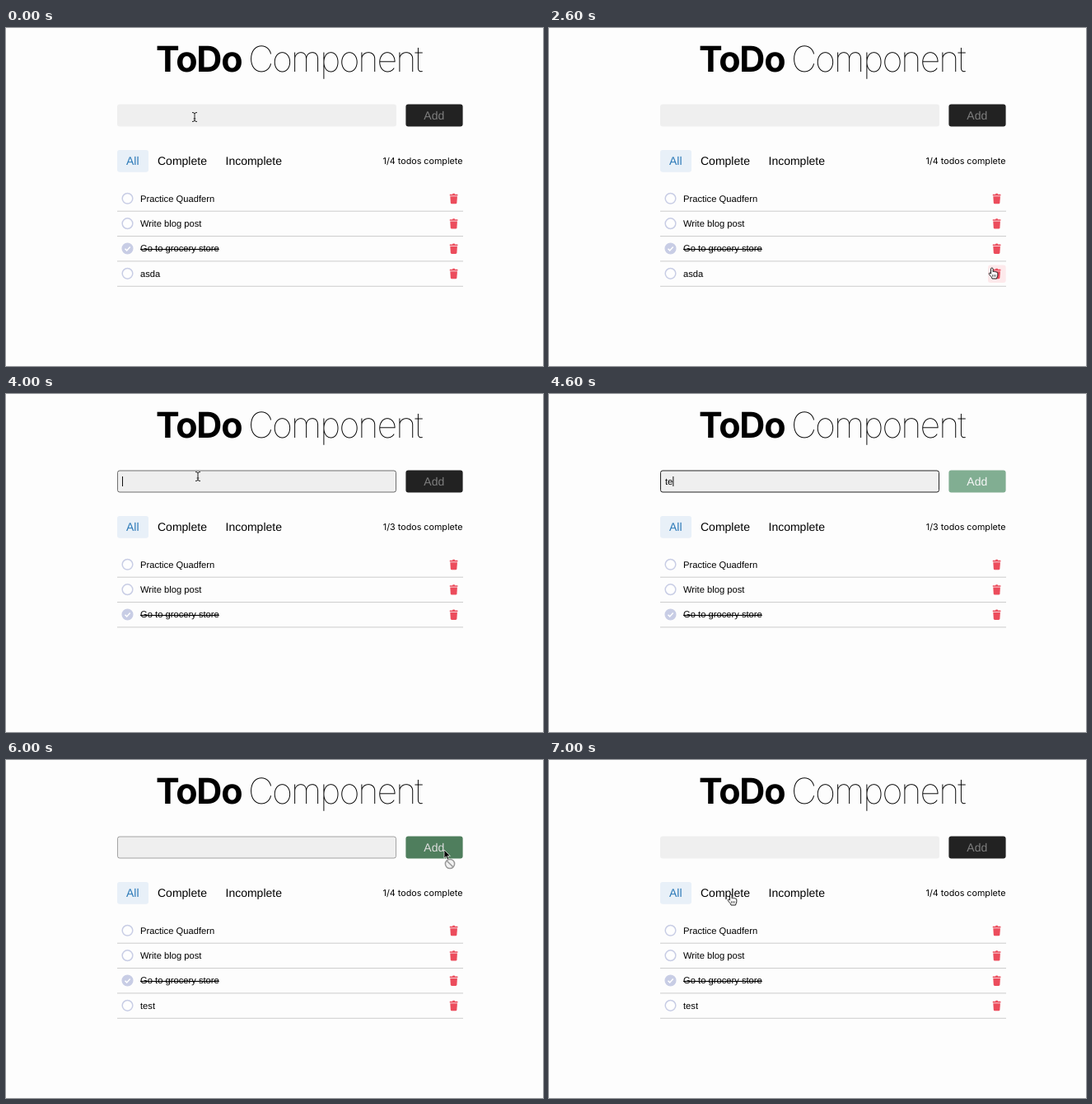
These frames come from a looping animation (652 px wide and 410 px high, 8 s). An HTML page:

```html
<!DOCTYPE html>
<html lang="en">
<head>
<meta charset="utf-8">
<title>ToDo Component</title>
<style>
html, body { margin: 0; width: 100%; height: 100%; overflow: hidden; background: #fdfdfd; }
svg { display: block; font: 14px "Liberation Sans", Arial, sans-serif; text-rendering: geometricPrecision; }
.title { font: 700 43px Inter, sans-serif; font-optical-sizing: none; letter-spacing: -1.2px; }
.title.thin { font-weight: 100; letter-spacing: -1.95px; }
.small { font-size: 11.2px; }
.count { font: 10.75px Inter, sans-serif; font-optical-sizing: none; }
.done { text-decoration: line-through; }
</style>
</head>
<body>
<svg width="652" height="410" viewBox="0 0 652 410">
  <defs>
    <g id="trash" fill="#ec4c5c">
      <path d="M538.8 201.8h3.2l.6-1h2l.6 1h3.2v1.7h-9.6z"/>
      <path d="M539.3 204.2h8.6l-.5 7.7q-.1 1.3-1.3 1.3h-5q-1.2 0-1.3-1.3z"/>
    </g>
    <g id="ibeam" fill="none" stroke="#222">
      <path d="M-3-5.5q3 0 3 1.5q0-1.5 3-1.5M0-4v8M-3 5.5q3 0 3-1.5q0 1.5 3 1.5M-1.3 2h2.6"/>
    </g>
    <path id="arrow" d="M0 0v10.2l2.4-2.2 1.7 3.8 1.7-.8-1.7-3.6h3.3z" stroke="#fff" stroke-width=".7"/>
    <g id="hand" fill="#fff" stroke="#111" stroke-width=".95" stroke-linejoin="round">
      <path d="M-1.5 1.2c0-1.6 2.6-1.6 2.6 0v3.6c.3-1 2-.8 2.1.2.5-.7 1.8-.5 1.9.4.6-.5 1.7-.2 1.7.8v2.6c0 2-1 2.2-1.2 4.2h-5.6c-.2-1.8-1.8-2.6-3.6-5.4-.8-1.2.6-2 1.6-1l.5.6z"/>
      <path d="M.4 8.2v2.6M2.3 8.2v2.6M4.2 8.2v2.6" stroke-width=".7"/>
    </g>
    <g id="denied">
      <use href="#arrow"/>
      <g fill="#f2f2f2" stroke="#999" stroke-width="1.5">
        <circle cx="7" cy="17" r="5.6"/><path d="M3.2 13.2l7.6 7.6"/>
      </g>
    </g>
  </defs>

  <text class="title" x="182" y="52.6">ToDo</text>
  <text class="title thin" x="294" y="52.6">Component</text>

  <rect x="135" y="92.5" width="339" height="27" rx="3" fill="#efefef"/>
  <rect id="border" x="135.5" y="93" width="338" height="26" rx="2.5" fill="none" stroke="#1c1c1c"/>
  <text id="typed" class="small" x="141" y="109.7"></text>
  <path id="caret" d="M0 100v12" stroke="#111"/>
  <rect id="button" x="485.4" y="92.5" width="69.2" height="27" rx="3"/>
  <text id="label" x="519.8" y="110.8" text-anchor="middle">Add</text>

  <rect x="135" y="148" width="38" height="26.7" rx="3" fill="#e8f0f8"/>
  <text x="146" y="166" fill="#2d7ab8">All</text>
  <text x="184" y="166">Complete</text>
  <text x="266.5" y="166">Incomplete</text>
  <text id="count" class="count" x="554.5" y="165.2" text-anchor="end"></text>

  <rect id="hover" x="533" y="287.5" width="21.7" height="21.5" rx="3" fill="#fde9eb"/>
  <g id="rows"></g>
  <use id="cursor"/>
</svg>
<script>
const LOOP = 8000, STEP = 100, ROW = 30.35;
const $ = id => document.getElementById(id);

const row = (text, i, done) => `<g transform="translate(0 ${i * ROW})">
  <circle cx="147.5" cy="206.8" r="6.3" fill="${done ? '#c8cde5' : '#fefefe'}" stroke="#c8cde5" stroke-width="1.5"/>
  ${done ? '<path d="M144.5 207l2.2 2.2 4-4.4" fill="none" stroke="#fff" stroke-width="1.5"/>' : ''}
  <text class="small ${done ? 'done' : ''}" x="163" y="210.8">${text}</text>
  <use href="#trash"/>
  <path d="M135 222.2h420" stroke="#ccc"/></g>`;

$('rows').innerHTML = ['Practice Quadfern', 'Write blog post', 'Go to grocery store', 'asda']
  .map((text, i) => row(text, i, i === 2)).join('');
const lastRow = $('rows').lastElementChild;
const lastText = lastRow.querySelector('text');

// time, shape, x, y
const cursorKeys = [
  [0, 'ibeam', 229, 108], [1800, 'arrow', 295, 152], [1900, 'arrow', 478, 274],
  [2000, 'arrow', 541, 319], [2300, 'arrow', 541, 314], [2400, 'hand', 540, 304],
  [2500, 'hand', 539, 295], [2600, 'hand', 538, 291], [3000, 'arrow', 538, 292],
  [3200, 'arrow', 525, 262], [3300, 'arrow', 455, 150], [3400, 'arrow', 355, 58],
  [3500, 'arrow', 284, 14], [3600, 'arrow', 262, 5], [3700, 'arrow', 242, 62],
  [3800, 'ibeam', 234, 99], [4000, 'ibeam', 233, 100], [4300, '', 0, 0],
  [5000, 'ibeam', 290, 108], [5100, 'ibeam', 400, 118], [5200, 'arrow', 455, 125],
  [5400, 'arrow', 488, 122], [5500, 'hand', 518, 113], [5600, 'hand', 530, 109],
  [5900, 'denied', 532, 109], [6500, 'arrow', 470, 128], [6600, 'arrow', 290, 162],
  [6700, 'hand', 222, 174], [6900, 'hand', 221, 169], [7000, 'hand', 221, 163]
];
const typedKeys = [[0, ''], [4300, 't'], [4600, 'te'], [4700, 'tes'], [4900, 'test'], [5900, '']];
// time, red, green, blue, label grey
const buttonKeys = [
  [0, 34, 34, 34, 126], [4200, 34, 34, 34, 126], [4600, 129, 174, 146, 246],
  [5400, 129, 174, 146, 246], [5700, 88, 145, 107, 246], [5900, 88, 145, 107, 246],
  [6000, 79, 126, 93, 222], [6200, 34, 34, 34, 126]
];
const borderKeys = [[0, 0], [3900, 0], [4000, .6], [4100, .95], [5700, .95], [6000, .35], [6200, 0]];
const hoverKeys = [[0, 0], [2300, 0], [2600, 1], [2900, 1], [3000, 0]];

const held = (keys, t) => keys.filter(k => k[0] <= t).pop();
function blend(keys, t) {
  const a = held(keys, t), b = keys[keys.indexOf(a) + 1] || a;
  const p = a === b ? 0 : (t - a[0]) / (b[0] - a[0]);
  return a.slice(1).map((v, i) => v + (b[i + 1] - v) * p);
}

function draw(t) {
  const [, shape, x, y] = held(cursorKeys, t);
  $('cursor').setAttribute('href', '#' + shape);
  $('cursor').setAttribute('transform', `translate(${x} ${y})`);
  $('cursor').style.display = shape ? '' : 'none';

  const [r, g, b, grey] = blend(buttonKeys, t);
  $('button').style.fill = `rgb(${r}, ${g}, ${b})`;
  $('label').style.fill = `rgb(${grey}, ${grey}, ${grey})`;
  $('border').style.opacity = blend(borderKeys, t)[0];
  $('hover').style.opacity = blend(hoverKeys, t)[0];

  const typed = held(typedKeys, t)[1];
  $('typed').textContent = typed;
  const end = typed ? $('typed').getComputedTextLength() : 0;
  $('caret').setAttribute('transform', `translate(${141.5 + end} 0)`);
  $('caret').style.display = t >= 4000 && t < 5800 ? '' : 'none';

  const removed = t >= 3000 && t < 5900;
  lastRow.style.display = removed ? 'none' : '';
  lastText.textContent = t < 3000 ? 'asda' : 'test';
  $('count').textContent = `1/${removed ? 3 : 4} todos complete`;
}

const start = performance.now();
function tick() {
  const t = (performance.now() - start) % LOOP;
  draw(Math.floor(t / STEP) * STEP);
  requestAnimationFrame(tick);
}
tick();
</script>
</body>
</html>
```
